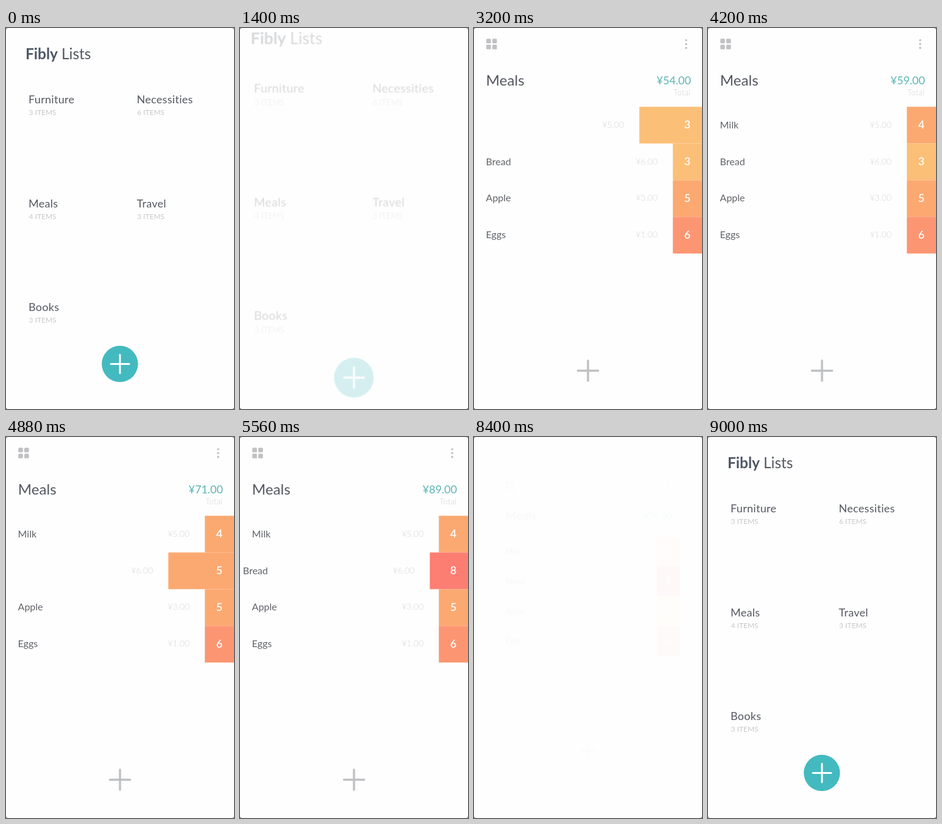
Write an HTML page that moves like this. It is 374 px wide and 622 px high and loops after 9.2 s.

```html
<!DOCTYPE html>
<html lang="en">
<head>
<meta charset="utf-8">
<title>Fibly Lists</title>
<style>
  html, body { margin: 0; width: 100%; height: 100%; overflow: hidden; background: #444; }
  svg { display: block; width: 374px; height: 622px; background: #fefefe; border-radius: 3px; }
  text { font-family: Lato, "Open Sans", sans-serif; fill: #54585f; }

  .brand { font-size: 24.5px; }
  .brand .bold { font-weight: 700; fill: #4c5664; }
  .name { font-size: 18px; letter-spacing: .3px; }
  .count { font-size: 12px; fill: #c8c8c8; }
  .title { font-size: 24px; letter-spacing: .1px; }
  .item { font-size: 16px; fill: #606368; }
  .price { font-size: 14px; font-weight: 300; fill: #d6d6d6; text-anchor: end; }
  .sum { font-size: 18px; fill: #5bb5b5; text-anchor: end; }
  .label { font-size: 13px; font-weight: 300; letter-spacing: .3px; fill: #d2d2d2; text-anchor: end; }
  .value { font-size: 18px; font-weight: 600; fill: #fff; text-anchor: middle; }
  .icon { fill: #c1c1c3; }

  #list, #detail, #add, .slide { animation: 9200ms linear infinite both; }
  #list, #detail { transform-origin: 187px 311px; }
  #add { transform-origin: 187px 548.5px; animation-name: add; }
  #list { animation-name: list; }
  #detail { animation-name: detail; }
  #slide0 { animation-name: slide0; }
  #slide1 { animation-name: slide1; }
  #slide2 { animation-name: slide2; }

  @keyframes list {
    0%, 13.7% { opacity: 1; transform: none; }
    15.65%, 91.96% { opacity: 0; transform: scale(1.12); animation-timing-function: ease-out; }
    95.3%, 100% { opacity: 1; transform: none; }
  }
  @keyframes add {
    0%, 16% { transform: none; }
    16.01%, 93.7% { transform: scale(0); animation-timing-function: ease-out; }
    96.4% { transform: scale(1.06); animation-timing-function: ease-in-out; }
    97.6%, 100% { transform: none; }
  }
  @keyframes detail {
    0%, 15.4% { opacity: 0; transform: scale(.8); animation-timing-function: ease-out; }
    17.39% { opacity: 1; transform: scale(.993); animation-timing-function: ease-out; }
    20.6%, 88.8% { opacity: 1; transform: none; }
    91.3%, 92.1% { opacity: .04; transform: scale(.81); }
    92.17%, 100% { opacity: 0; transform: scale(.8); }
  }
  @keyframes slide0 {
    0%, 28.26% { transform: none; }
    28.7% { transform: translateX(-7px); animation-timing-function: ease-out; }
    33% { transform: translateX(-52px); }
    37.83% { transform: translateX(-60px); animation-timing-function: ease-in-out; }
    40.6%, 100% { transform: none; }
  }
  @keyframes slide1 {
    0%, 47.83% { transform: none; }
    48.26% { transform: translateX(-5px); animation-timing-function: ease-out; }
    53.9% { transform: translateX(-62px); }
    58.04% { transform: translateX(-80px); animation-timing-function: ease-in; }
    60.43% { transform: translateX(-15px); animation-timing-function: ease-out; }
    63%, 100% { transform: none; }
  }
  @keyframes slide2 {
    0%, 68.26% { transform: none; animation-timing-function: ease-out; }
    71.3% { transform: translateX(34px); animation-timing-function: ease-in-out; }
    73.91% { transform: translateX(1px); }
    75.65%, 100% { transform: none; }
  }
</style>
</head>
<body>
<svg viewBox="0 0 374 622">
  <defs><clipPath id="screen"><rect width="374" height="622"/></clipPath></defs>
  <g id="list">
    <text class="brand" x="32" y="51"><tspan class="bold">Fibly</tspan><tspan x="91">Lists</tspan></text>
    <g id="cards"></g>
    <g id="add">
      <circle cx="186.8" cy="548.4" r="29.7" fill="#43babf"/>
      <path d="M172 548.4h30M186.9 533.4v30" stroke="#fff" stroke-width="3" stroke-linecap="round"/>
    </g>
  </g>
  <g id="detail">
    <g clip-path="url(#screen)">
      <g class="icon">
        <rect x="20.2" y="17.4" width="7.6" height="7.6" rx="1.5"/>
        <rect x="30" y="17.4" width="7.6" height="7.6" rx="1.5"/>
        <rect x="20.2" y="27.2" width="7.6" height="7.6" rx="1.5"/>
        <rect x="30" y="27.2" width="7.6" height="7.6" rx="1.5"/>
        <circle cx="348" cy="20" r="1.8"/>
        <circle cx="348" cy="26.3" r="1.8"/>
        <circle cx="348" cy="32.6" r="1.8"/>
      </g>
      <text class="title" x="19.7" y="94">Meals</text>
      <text class="sum" id="sum" x="356" y="92"></text>
      <text class="label" x="355.5" y="110">Total</text>
      <g id="rows"></g>
      <path d="M170.5 559.5h33M187 543v33" stroke="#bfc0c2" stroke-width="3.5" stroke-linecap="round"/>
    </g>
  </g>
</svg>
<script>
  const LOOP = 9200;
  const $ = id => document.getElementById(id);

  const cards = [['Furniture', 3], ['Necessities', 6], ['Meals', 4], ['Travel', 3], ['Books', 3]];
  $('cards').innerHTML = cards.map(([name, n], i) => {
    const x = i % 2 ? 214.5 : 37, y = 123 + 169.7 * (i >> 1);
    return `<text class="name" x="${x}" y="${y}">${name}</text>
      <text class="count" x="${x + .5}" y="${y + 19}">${n} ITEMS</text>`;
  }).join('');

  // start: first count change, gap: ms between changes
  const rows = [
    { name: 'Milk', price: 5, from: 1, to: 4, start: 2840, gap: 230 },
    { name: 'Bread', price: 6, from: 3, to: 8, start: 4620, gap: 160 },
    { name: 'Apple', price: 3, from: 5, to: 0, start: 6380, gap: 55 },
    { name: 'Eggs', price: 1, from: 6, to: 6, start: 0, gap: 1 }
  ];
  const heat = ['#fddb84', '#fddb84', '#fccd7e', '#fcbf78', '#fca971', '#fca971', '#fc9672', '#fc8a72', '#fc7e73'];

  $('rows').innerHTML = rows.map((r, i) => {
    const y = 128.6 + 59.9 * i;
    return `<g class="slide" id="slide${i}">
        <text class="item" x="19.6" y="${y + 35}">${r.name}</text>
        <text class="price" x="301" y="${y + 34}">¥${r.price.toFixed(2)}</text>
        <rect id="box${i}" x="326.2" y="${y}" width="200" height="59.9"/>
      </g>
      <text class="value" id="value${i}" x="350" y="${y + 35.3}"></text>`;
  }).join('');

  function countAt(r, t) {
    const steps = t < r.start ? 0 : Math.floor((t - r.start) / r.gap) + 1;
    return r.from + Math.sign(r.to - r.from) * Math.min(steps, Math.abs(r.to - r.from));
  }

  let origin;
  function draw(now) {
    origin ??= now;
    const t = (now - origin) % LOOP;
    let sum = 0;
    rows.forEach((r, i) => {
      const n = countAt(r, t);
      sum += n * r.price;
      $('value' + i).textContent = n;
      $('box' + i).setAttribute('fill', heat[n]);
    });
    $('sum').textContent = '¥' + sum.toFixed(2);
    requestAnimationFrame(draw);
  }
  requestAnimationFrame(draw);
</script>
</body>
</html>
```
